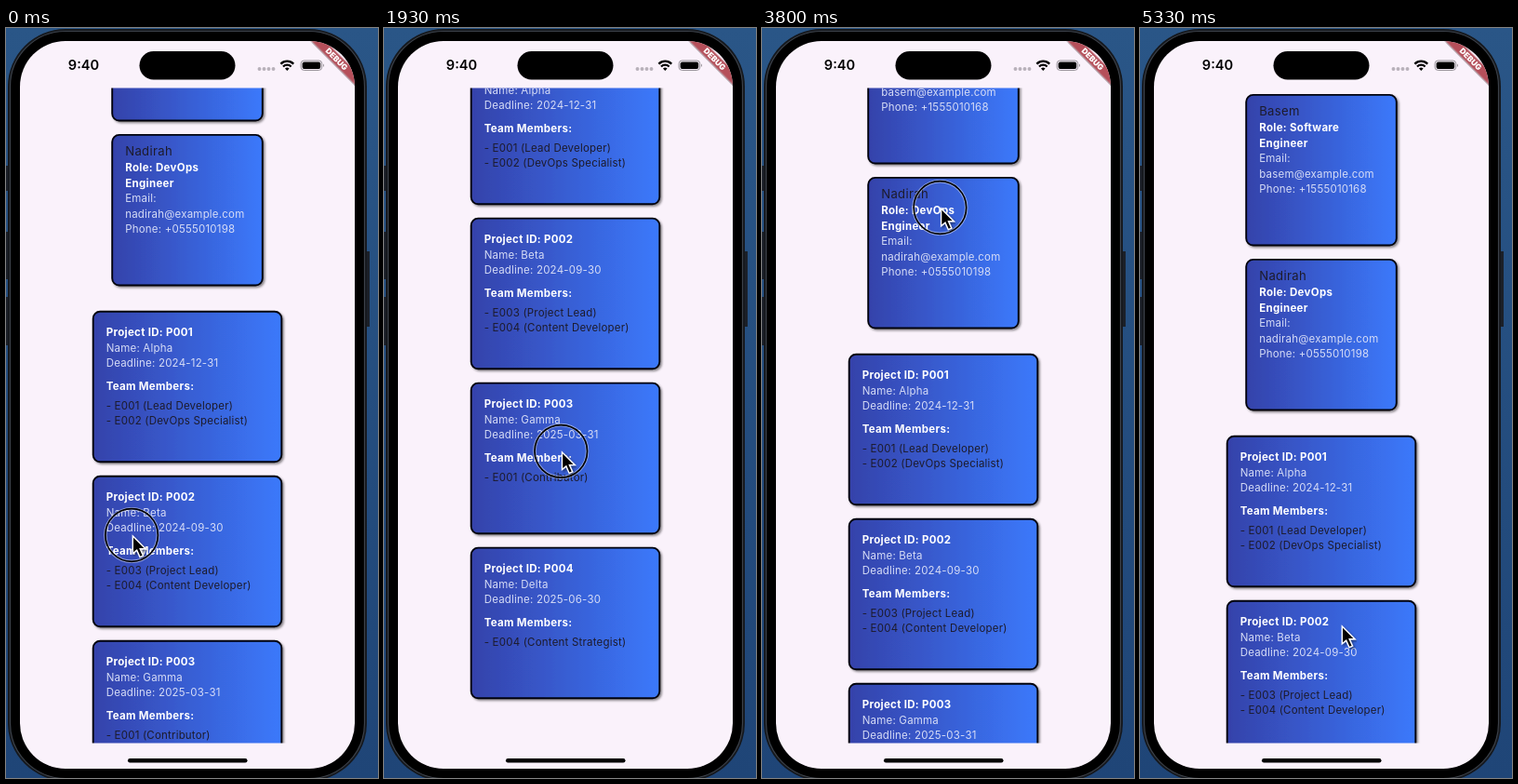
Recreate the animation shown at these times as an HTML page. Size 400 by 806 pixels, loop 5400 ms.

```html
<!DOCTYPE html>
<html lang="en">
<head>
<meta charset="utf-8">
<title>Team and projects</title>
<style>
  html, body { margin: 0; width: 100%; height: 100%; overflow: hidden; background: #24497c; }
  svg { display: block; font-family: Inter, Roboto, sans-serif; }
  .card text { font-size: 11.5px; letter-spacing: .2px; fill: #d6dcf6; }
  .card .bold { font-weight: 700; fill: #fff; letter-spacing: .3px; }
  .card .dark { fill: #1d1b2c; }
  .card .name { font-size: 13.1px; letter-spacing: .35px; fill: #1d1b2c; }
  .card rect { stroke: #05060c; stroke-width: 1.9; }
</style>
</head>
<body>
<svg width="400" height="806" viewBox="0 0 400 806">
  <defs>
    <linearGradient id="wall" x2="0" y2="1">
      <stop stop-color="#2a5687"/><stop offset="1" stop-color="#1f4577"/>
    </linearGradient>
    <linearGradient id="blue">
      <stop stop-color="#3542aa"/><stop offset="1" stop-color="#3b79fb"/>
    </linearGradient>
    <filter id="shadow" x="-5%" y="-5%" width="112%" height="112%">
      <feDropShadow dx="1.7" dy="1.7" stdDeviation="1.3" flood-opacity=".45"/>
    </filter>
    <clipPath id="screen"><rect x="15" y="14" width="360" height="782" rx="49"/></clipPath>
    <clipPath id="view"><rect x="15" y="64.5" width="360" height="704"/></clipPath>
  </defs>

  <rect width="400" height="806" fill="url(#wall)"/>
  <path d="M0 148h3v27H0zM0 219h3v51H0zM0 289h3v52H0zM387 240h4v81h-4z" fill="#1b2029"/>
  <rect x="2" y="1" width="386" height="808" rx="62" fill="#15181d"/>
  <rect x="4.5" y="3.5" width="381" height="803" rx="59.5" stroke="#3c4149" stroke-width="1.2"/>
  <rect x="15" y="14" width="360" height="782" rx="49" fill="#faf2fb"/>

  <g clip-path="url(#view)"><g id="list"></g></g>

  <g clip-path="url(#screen)">
    <g transform="translate(375 14) rotate(45)">
      <rect x="-34" y="22.4" width="68" height="10.2" fill="#b5505a" filter="url(#shadow)"/>
      <text y="30.5" text-anchor="middle" font-size="8.5" font-weight="900" fill="#fff">DEBUG</text>
    </g>
  </g>

  <text x="83.5" y="45.3" text-anchor="middle" font-size="14.6" font-weight="600">9:40</text>
  <rect x="143.5" y="25" width="103" height="30.5" rx="15.2"/>
  <path d="M272.5 44h15.1" stroke="#b8b1ba" stroke-width="3.9" stroke-linecap="round" stroke-dasharray="0 5"/>
  <g fill="none" stroke="#000" stroke-width="2.3">
    <path d="M295.4 38.6a9.7 9.7 0 0 1 13.8 0M298 41.5a6 6 0 0 1 8.6 0"/>
    <path d="M302.3 46l-2.3-2.4a3.3 3.3 0 0 1 4.6 0z" fill="#000" stroke="none"/>
  </g>
  <rect x="317.1" y="35" width="22.6" height="10.4" rx="3.3" fill="none" stroke="#948f96"/>
  <rect x="318.6" y="36.5" width="19.6" height="7.4" rx="2"/>
  <path d="M341 38.5q2 1.7 0 3.4z" fill="#948f96"/>
  <rect x="131" y="785" width="128.5" height="4.5" rx="2.2"/>

  <g id="pointer">
    <g id="ring" fill="none">
      <circle cx="-1.2" cy="-1" r="28.3" stroke="#fff" stroke-opacity=".45" stroke-width="3.5"/>
      <circle cx="-1.2" cy="-1" r="28.3" stroke="#000" stroke-width="1.7"/>
    </g>
    <path d="M0 0V18.7L4.4 15.1L7.7 22.6L11.2 21.1L7.9 13.8H13.8Z"
      stroke="#fff" stroke-width="1.4" filter="url(#shadow)"/>
  </g>
</svg>
<script>
const $ = id => document.getElementById(id);
const LOOP = 5400, FPS = 15, MAX_SCROLL = 371;
const CENTER = 195, HEIGHT = 163.6, PITCH = 177;

// Cards: text lines are [centre y, style, text]
function card(y, width, lines) {
  const rows = lines.map(([dy, style, text]) =>
    `<text class="${style}" x="15" y="${dy + (style === 'name' ? 4.8 : 4.2)}">${text}</text>`);
  return `<g class="card" transform="translate(${CENTER - width / 2} ${y})">
    <rect x="1" y="1" width="${width - 2}" height="${HEIGHT - 2}" rx="7.5" fill="url(#blue)" filter="url(#shadow)"/>
    ${rows.join('')}</g>`;
}

const person = (i, name, role, phone) => card(70.9 + PITCH * i, HEIGHT, [
  [18, 'name', name],
  [36, 'bold', `Role: ${role}`],
  [52.5, 'bold', 'Engineer'],
  [69, '', 'Email:'],
  [85.5, '', `${name.toLowerCase()}@example.com`],
  [101.7, '', `Phone: ${phone}`]
]);

const project = (i, name, deadline, ...members) => card(437.7 + PITCH * i, 204.6, [
  [23.3, 'bold', `Project ID: P00${i + 1}`],
  [39.8, '', `Name: ${name}`],
  [56.2, '', `Deadline: ${deadline}`],
  [80.7, 'bold', 'Team Members:'],
  ...members.map((m, k) => [102 + 16.5 * k, 'dark', `- ${m}`])
]);

$('list').innerHTML =
  person(0, 'Basem', 'Software', '+1555010168') +
  person(1, 'Nadirah', 'DevOps', '+0555010198') +
  project(0, 'Alpha', '2024-12-31', 'E001 (Lead Developer)', 'E002 (DevOps Specialist)') +
  project(1, 'Beta', '2024-09-30', 'E003 (Project Lead)', 'E004 (Content Developer)') +
  project(2, 'Gamma', '2025-03-31', 'E001 (Contributor)') +
  project(3, 'Delta', '2025-06-30', 'E004 (Content Strategist)');

// Monotone cubic curve through [time, value] keys
function track(keys) {
  const slope = i => (keys[i + 1][1] - keys[i][1]) / (keys[i + 1][0] - keys[i][0]);
  const tangent = i => {
    if (i === 0) return slope(0);
    if (i === keys.length - 1) return 0;
    const a = slope(i - 1), b = slope(i);
    return a * b > 0 ? 2 * a * b / (a + b) : 0;
  };
  return t => {
    let i = 0;
    while (i < keys.length - 2 && t >= keys[i + 1][0]) i++;
    const [t0, v0] = keys[i], [t1, v1] = keys[i + 1];
    const d = t1 - t0, u = (t - t0) / d, w = 1 - u;
    return v0 * w * w * (1 + 2 * u) + v1 * u * u * (3 - 2 * u)
      + d * u * w * (tangent(i) * w - tangent(i + 1) * u);
  };
}

const pointerX = track([[0, 136.3], [400, 152], [1400, 177], [1530, 177], [2400, 209.5],
  [2470, 209.5], [3000, 191.5], [3800, 192.6], [4400, 217.3], [LOOP, 217.3]]);
const pointerY = track([[0, 546], [400, 420], [700, 415], [1400, 563], [1530, 563],
  [2330, 341], [2470, 337], [2900, 690], [3000, 728], [3130, 757], [3600, 180],
  [3800, 194], [4400, 642.5], [LOOP, 643]]);
const finger = track([[0, 134], [400, 260], [700, 298], [1200, 311], [1530, 311],
  [2330, 533], [2470, 537], [2900, 195], [3000, 164], [3200, 116], [3600, 90],
  [3800, 88], [4400, -351], [4450, -351], [4600, -80], [4800, -8], [5100, 0], [LOOP, 0]]);
const presses = [[0, 430], [1450, 2980], [3650, 4460]];

// Overscroll resistance past either end
const resist = d => 265 * d / (265 + d);
const scrollAt = v => v < 0 ? -resist(-v)
  : v > MAX_SCROLL ? MAX_SCROLL + resist(v - MAX_SCROLL) : v;

function draw(now) {
  const t = Math.floor((now % LOOP) * FPS / 1000 + .1) * 1000 / FPS % LOOP;
  $('list').setAttribute('transform', `translate(0 ${-scrollAt(finger(t))})`);
  $('pointer').setAttribute('transform', `translate(${pointerX(t)} ${pointerY(t)})`);
  const pressed = presses.some(([from, to]) => t >= from && t < to);
  $('ring').setAttribute('visibility', pressed ? 'visible' : 'hidden');
}

const start = performance.now();
function tick() {
  draw(performance.now() - start);
  requestAnimationFrame(tick);
}
tick();
</script>
</body>
</html>
```
